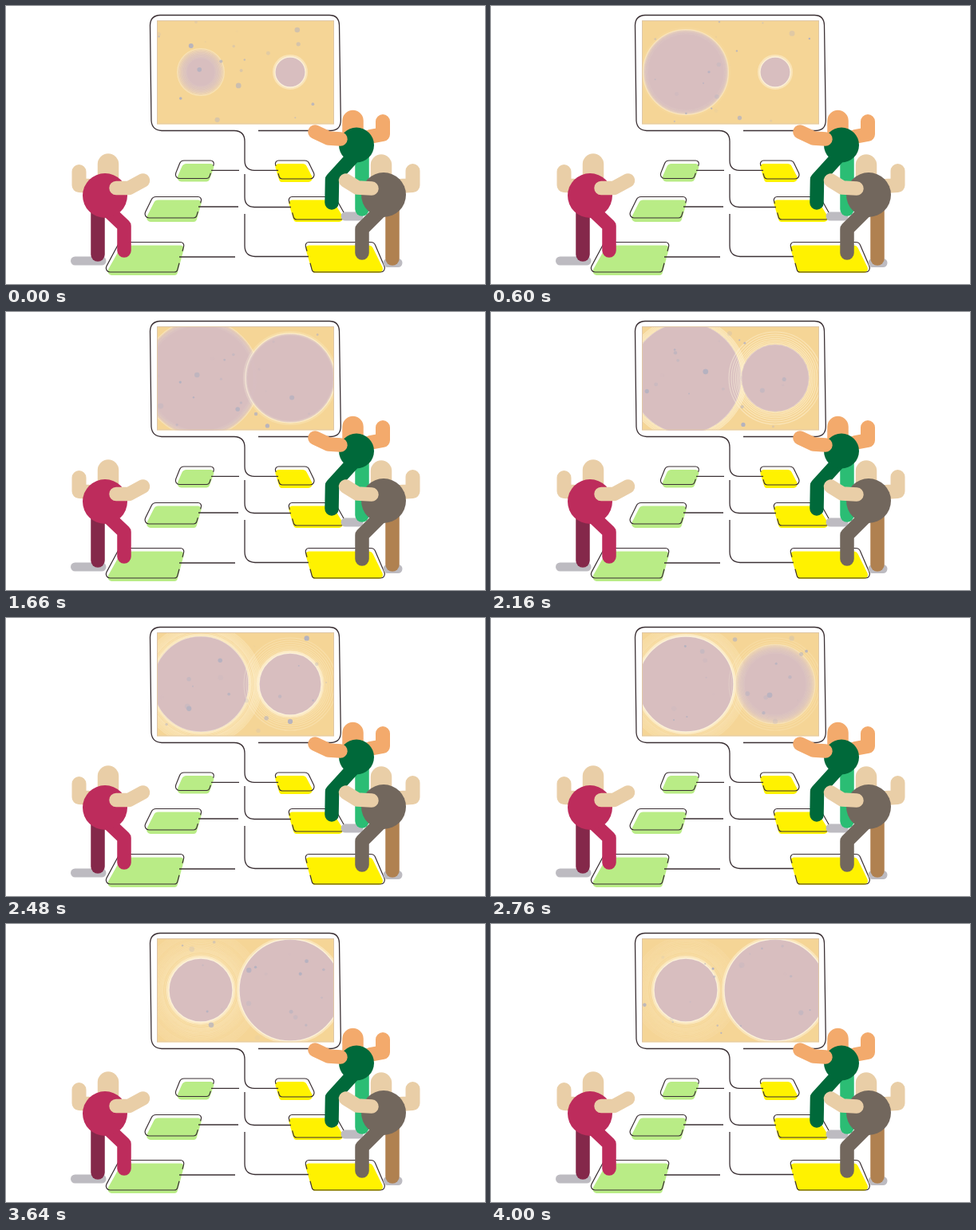
These frames come from a looping animation (600 px wide and 349 px high, 4020 ms). An HTML page with a canvas:

```html
<!DOCTYPE html>
<html lang="en">
<head>
<meta charset="utf-8">
<title>Team screen</title>
<style>
html, body { margin: 0; width: 100%; height: 100%; overflow: hidden; background: #fff; }
canvas { display: block; width: 600px; height: 349px; }
</style>
</head>
<body>
<canvas id="stage" width="600" height="349"></canvas>
<script>
const STEP = 20, STEPS = 201, TRAIL = 90, LAG = 12, DOT_LIFE = 20;
const INK = '#3b3034', SAND = '#f5d596', MAUVE = '#d5bcc0', CREAM = '#fff7df';
const SKIN = '#e9cea7', PEACH = '#f3aa6c', SHADOW = '#bdbbc1';
const GREEN = '#b9ec86', YELLOW = '#fff200';
const ctx = document.getElementById('stage').getContext('2d');
const scene = document.createElement('canvas');
scene.width = 600;
scene.height = 349;

// Turning points [ms, radius], eased out from one to the next
const discs = [
  { x: 244, y: 83, keys: [[-160, 18], [800, 55], [1200, 54], [1900, 76], [2060, 76],
    [2500, 60], [3000, 60], [3500, 40]] },
  { x: 356, y: 83, keys: [[850, 19], [1500, 54], [2020, 58], [2260, 39], [2580, 39], [3300, 64]] }
];

function radius(keys, t) {
  const i = keys.findIndex(k => k[0] > t);
  if (i === 0) return keys[0][1];
  if (i < 0) return keys[keys.length - 1][1];
  const [t0, r0] = keys[i - 1], [t1, r1] = keys[i];
  const rest = (t1 - t) / (t1 - t0);
  return r1 + (r0 - r1) * rest * rest;
}

function hash(n) {
  const s = Math.sin(n * 127.1 + 31.7) * 43758.5453;
  return s - Math.floor(s);
}

const mix = (a, b, u) => [a[0] + (b[0] - a[0]) * u, a[1] + (b[1] - a[1]) * u];

function line(c, pts, width, color) {
  c.beginPath();
  pts.forEach(([x, y]) => c.lineTo(x, y));
  c.lineWidth = width;
  c.strokeStyle = color;
  c.lineCap = c.lineJoin = 'round';
  c.stroke();
}

function disc(c, x, y, r, color) {
  c.beginPath();
  c.arc(x, y, r, 0, Math.PI * 2);
  c.fillStyle = color;
  c.fill();
}

// Rounded slab: starts and ends on the side facing the middle, leaving a gap there
function slab(c, [a, b, d, e], gap) {
  c.beginPath();
  c.moveTo(...mix(a, e, 0.5 - gap));
  c.arcTo(...a, ...b, 4);
  c.arcTo(...b, ...d, 6);
  c.arcTo(...d, ...e, 5);
  c.arcTo(...e, ...a, 4);
  c.lineTo(...mix(a, e, 0.5 + gap));
}

function tile(c, color, [inTop, outTop, outLow, inLow], top, low, drop) {
  const side = Math.sign(outTop - inTop);
  slab(c, [[inTop, top + 4], [outTop + 3 * side * -1, top + 4],
    [outLow - 2 * side, low + drop], [inLow, low + drop]], 0);
  c.fillStyle = color;
  c.fill();
  slab(c, [[inTop, top], [outTop, top], [outLow, low], [inLow, low]], 0.2);
  c.lineWidth = 1.2;
  c.strokeStyle = INK;
  c.stroke();
}

function person(c, p) {
  line(c, p.shadow, 11, SHADOW);
  line(c, p.backLeg, 17.5, p.back);
  line(c, p.head, 26.5, p.skin);
  line(c, p.farArm, 18, p.skin);
  line(c, p.frontLeg, 17.5, p.color);
  disc(c, ...p.body, p.color);
  line(c, p.nearArm, 17.5, p.skin);
}

function buildScene() {
  const c = scene.getContext('2d');
  c.fillStyle = '#fff';
  c.fillRect(0, 0, 600, 349);

  tile(c, GREEN, [262, 219, 210, 254], 194, 216.5, 4);
  tile(c, GREEN, [246, 184, 171, 238], 239.5, 266, 5);
  tile(c, GREEN, [224, 142, 122, 214], 296.5, 334, 4);
  tile(c, YELLOW, [336, 378, 389, 343], 194, 217, 4);
  tile(c, YELLOW, [353, 412, 428, 361], 239.5, 268, 3);
  tile(c, YELLOW, [374, 461, 477, 384], 296.5, 334, 1);

  c.lineWidth = 1.3;
  c.strokeStyle = INK;
  c.stroke(new Path2D('M316 156.500H407Q419.500 156 419.300 143L417.500 24Q417 11.500 405 11.500' +
    'H193Q181 12 180.500 24L182 144Q183 156 195 156.500H286Q299 157 299 170V194Q299 206 311 206.300H341' +
    'M299 211V240Q299 252 311 252.500H357M299 261V301Q299 314 312 314.500H379' +
    'M257 206.300H292M241 252H291M217 315H287'));

  person(c, {
    color: '#00693a', back: '#2bbd74', skin: PEACH, body: [439, 174.5, 22],
    shadow: [[425, 264], [442, 264]], backLeg: [[446, 190], [446, 255]],
    head: [[434.5, 144], [434.5, 160]], farArm: [[472, 145], [472, 161], [456, 164]],
    frontLeg: [[433, 191], [408.5, 218], [408, 247]], nearArm: [[387, 158], [404, 166], [419, 167]]
  });
  person(c, {
    color: '#72675d', back: '#b08150', skin: SKIN, body: [473, 237, 28],
    shadow: [[478, 322.5], [491, 322.5]], backLeg: [[484, 255], [484, 317]],
    head: [[470, 199.5], [470, 215]], farArm: [[509.5, 207], [509.5, 225], [494, 226]],
    frontLeg: [[468, 258], [446, 280], [446, 310]], nearArm: [[425.5, 219], [440, 228], [458, 229]]
  });
  person(c, {
    color: '#bd2c5c', back: '#84284a', skin: SKIN, body: [124, 238, 28],
    shadow: [[86.5, 320], [120, 320]], backLeg: [[115, 255], [115, 312]],
    head: [[128, 198.5], [128, 215]], farArm: [[91.5, 208], [91.5, 225], [106, 226]],
    frontLeg: [[128, 257], [148, 276], [148, 307]], nearArm: [[138, 228.5], [154, 228.5], [171.5, 219]]
  });
}

function ring({ x, y }, r, width, alpha) {
  ctx.globalAlpha = alpha;
  ctx.lineWidth = width;
  ctx.beginPath();
  ctx.arc(x, y, r, 0, Math.PI * 2);
  ctx.stroke();
}

function drawDisc(d, step) {
  const past = Array.from({ length: TRAIL }, (_, age) => radius(d.keys, (step - age) * STEP));
  const now = past[0];
  const calm = Math.max(0, 1 - Math.abs(now - past[8]) / 4);

  // Larger past outlines linger outside
  let last = now;
  past.forEach((r, age) => {
    if (r < last + 0.9) return;
    ring(d, r, 1.1, 0.5 * Math.exp(-age / 22) + 0.1);
    last = r;
  });
  ring(d, now + 0.5, 5, 0.45 * calm);

  // The fill builds up over several steps, so a growing rim stays pale
  ctx.globalAlpha = 0.24;
  for (let age = LAG; age >= 0; age--) disc(ctx, d.x, d.y, Math.min(now, past[age]), MAUVE);

  last = now;
  past.slice(0, LAG).forEach((r, age) => {
    if (r > last - 0.6) return;
    ring(d, r, 0.8, 0.4 * Math.exp(-age / 6));
    last = r;
  });
  ring(d, now, 1.3, 0.4 + 0.45 * calm);
}

function drawScreen(step) {
  ctx.save();
  ctx.beginPath();
  ctx.rect(189, 18, 222, 130.5);
  ctx.clip();
  ctx.fillStyle = SAND;
  ctx.fillRect(189, 18, 222, 131);
  ctx.strokeStyle = CREAM;
  discs.forEach(d => drawDisc(d, step));

  // One new speck each step, fading out
  for (let age = DOT_LIFE - 1; age >= 0; age--) {
    const n = step - age;
    ctx.globalAlpha = 0.95 * (1 - age / DOT_LIFE);
    disc(ctx, 191 + 218 * hash(n), 20 + 126 * hash(n + 400), 1 + 2.5 * hash(n + 900) ** 1.5, '#b3b1c0');
  }
  ctx.globalAlpha = 1;
  ctx.lineWidth = 1;
  ctx.strokeStyle = '#dfc6a6';
  ctx.strokeRect(189.5, 18.5, 221, 129.5);
  ctx.restore();
}

let start = null;
function frame(now) {
  if (start === null) start = now;
  const step = Math.floor(Math.max(0, now - start) / STEP) % STEPS;
  ctx.drawImage(scene, 0, 0);
  drawScreen(step);
  requestAnimationFrame(frame);
}

buildScene();
requestAnimationFrame(frame);
</script>
</body>
</html>
```
